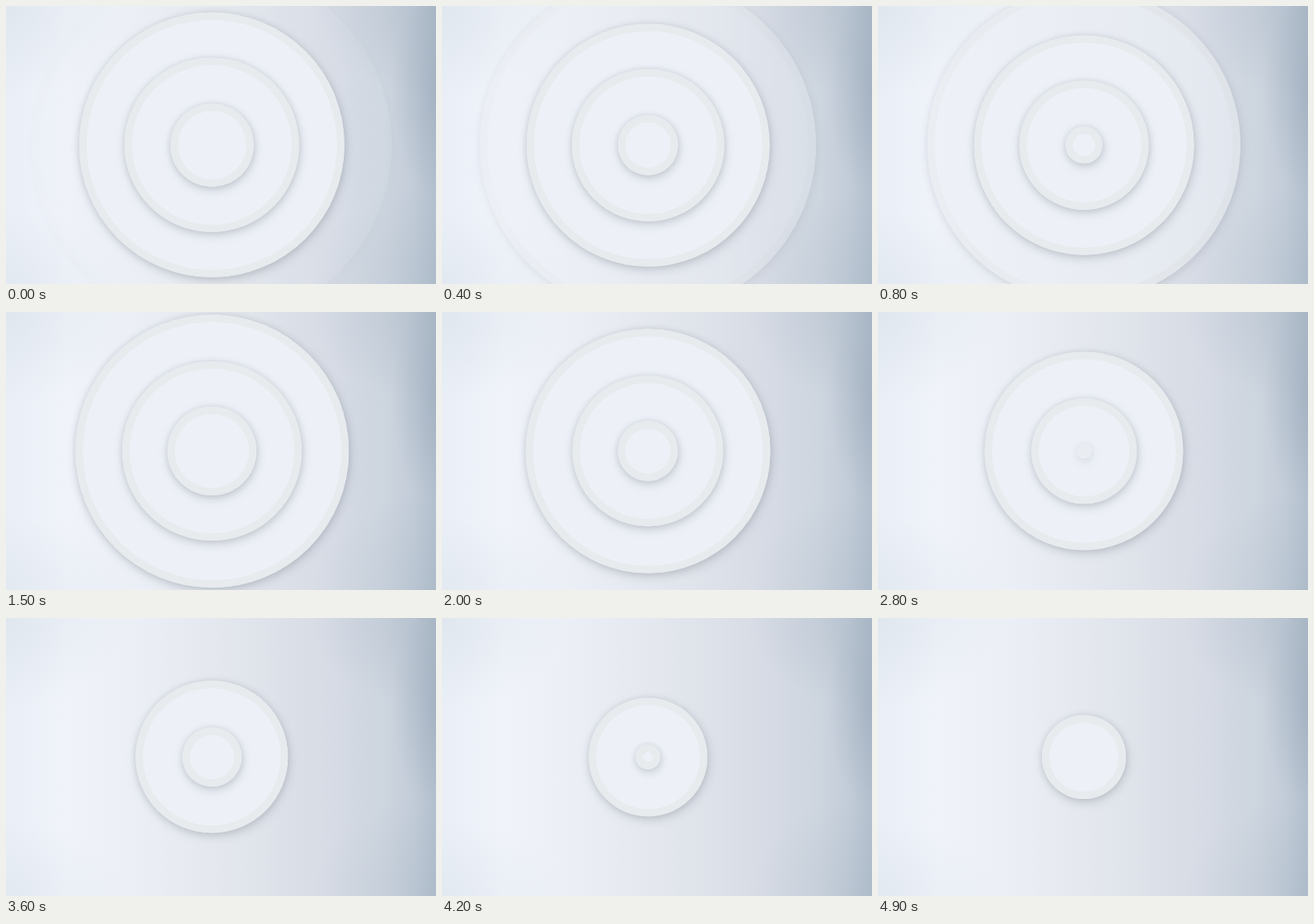
An HTML page that plays this animation: 522x338 px, repeating every 5000 ms.

```html
<!DOCTYPE html>
<html lang="en">
<head>
<meta charset="utf-8">
<title>Shrinking discs</title>
<style>
@property --n {
  syntax: "<number>";
  inherits: true;
  initial-value: 0;
}
html, body {
  margin: 0;
  width: 100%;
  height: 100%;
  overflow: hidden;
}
.stage {
  position: relative;
  width: 522px;
  height: 338px;
  overflow: hidden;
  background:
    radial-gradient(ellipse 60px 130px at 528px 105px, rgba(140, 156, 174, .4), transparent),
    radial-gradient(ellipse 150px 110px at 522px 0, rgba(150, 166, 182, .3), transparent),
    radial-gradient(ellipse 150px 120px at 522px 338px, rgba(150, 168, 184, .22), transparent),
    radial-gradient(ellipse 150px 110px at 0 0, rgba(208, 218, 226, .4), transparent),
    radial-gradient(ellipse 150px 90px at 0 338px, rgba(212, 221, 230, .35), transparent),
    linear-gradient(90deg, #eaeff7 0, #f0f3fa 75px, #ebeff5 165px, #e4e8ee 260px,
      #dce0e8 340px, #d5dae4 405px, #cdd5df 460px, #c2ccd8 495px, #b4c0ce 522px);
  animation: shrink 5s infinite;
}
.disc {
  --r: max(0, var(--r0) - 3.48 * var(--n));
  position: absolute;
  left: 250px;
  top: 169px;
  width: calc(var(--r) * 2px);
  height: calc(var(--r) * 2px);
  transform: translate(-50%, -50%);
  border-radius: 50%;
  background: #edf1f7;
  box-shadow:
    inset 0 0 0 9px #e7ebee,
    0 0 6px rgba(110, 118, 128, .16),
    1px 4px 12px rgba(100, 108, 120, .27);
  opacity: clamp(0, var(--r) / 16, 1);
}
.rising {
  opacity: clamp(0, .1 + .065 * var(--n), 1);
}
/* 48 equal steps, then a short hold */
@keyframes shrink {
  0% { --n: 0; animation-timing-function: steps(48, end); }
  96%, 100% { --n: 48; }
}
</style>
</head>
<body>
<div class="stage">
  <div class="disc rising" style="--r0: 218"></div>
  <div class="disc" style="--r0: 161.2"></div>
  <div class="disc" style="--r0: 106.2"></div>
  <div class="disc" style="--r0: 50.3"></div>
</div>
</body>
</html>
```
